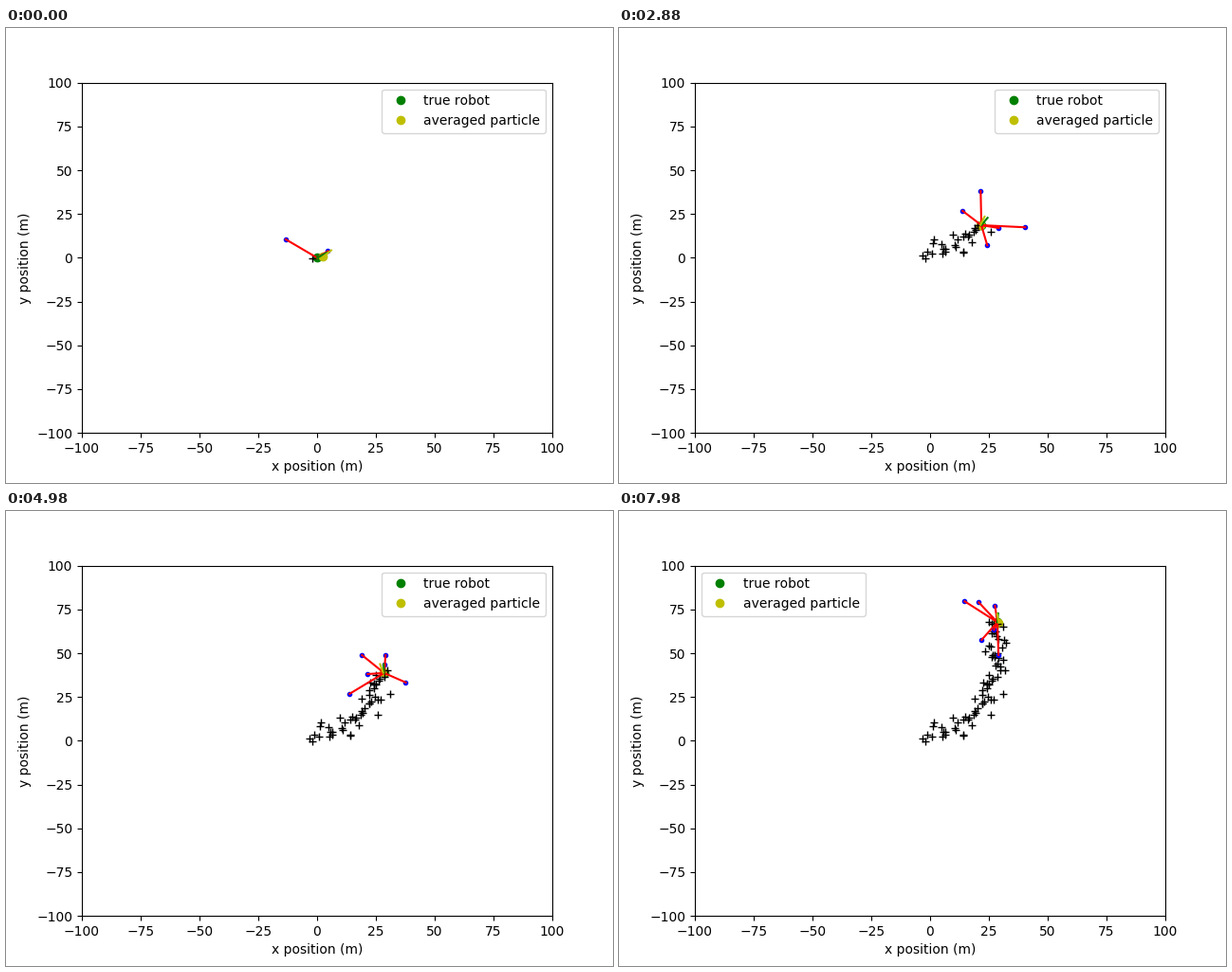
Recreate the animation shown at these times as a matplotlib script. Size 640 px wide and 480 px high, loop 8000 ms.

```python
import numpy as np
import matplotlib.pyplot as plt
from matplotlib.animation import FuncAnimation

STEPS, LOOP = 134, 8000
SPEED, RANGE, NOSE = 0.6, 20.0, 5.0
READINGS, NOISE = 74, 2.8
LEGEND_MOVE = 130

# step, x, y and heading in degrees along the drive
WAYPOINTS = np.array([
    (0, 0, 0, 35), (15, 7, 5.6, 40), (48, 21.8, 18.6, 58),
    (67, 26.1, 29.4, 76), (83, 28.5, 38.7, 93), (103, 26.7, 50.4, 107),
    (133, 28.6, 67.7, 86)])

LANDMARKS = np.array([
    (-13.3, 10.5), (4.6, 3.8), (24.3, 7.1), (13.8, 26.8), (21.5, 38.1),
    (29.2, 17), (40.5, 17.4), (29.1, 48.9), (28.8, 43.3), (37.7, 33.3),
    (19.1, 48.9), (21.9, 57.6), (27.2, 63.4), (27.6, 77.1), (20.7, 79),
    (14.7, 79.6)])


def unit(deg):
    rad = np.radians(deg)
    return np.stack([np.cos(rad), np.sin(rad)], axis=-1)


def drive(steps):
    """Smooth curve through the waypoints, leaving each along its heading."""
    when, points = WAYPOINTS[:, 0], WAYPOINTS[:, 1:3]
    slopes = SPEED * unit(WAYPOINTS[:, 3])
    i = np.clip(np.searchsorted(when, steps, "right") - 1, 0, len(when) - 2)
    span = (when[i + 1] - when[i])[:, None]
    u = (steps - when[i])[:, None] / span
    return ((1 + 2 * u) * (1 - u) ** 2 * points[i]
            + u * (1 - u) ** 2 * span * slopes[i]
            + u * u * (3 - 2 * u) * points[i + 1]
            + u * u * (u - 1) * span * slopes[i + 1])


steps = np.arange(STEPS)
robot = drive(steps)
heading = np.interp(steps, WAYPOINTS[:, 0], WAYPOINTS[:, 3])

# the estimate closes in on the robot, then drifts slowly around it
settle = 2 * np.exp(-steps / 10)
drift = 0.6 * np.cos(2 * np.pi * steps / (STEPS - 1))
average = robot + np.outer(settle, (1, 0.45)) + np.outer(drift, (1, -0.5))
robot_nose = robot + NOSE * unit(heading)
average_nose = average + NOSE * unit(heading + 12)

rng = np.random.default_rng(4)
arrivals = np.linspace(0, STEPS - 1, READINGS).astype(int)
readings = robot[arrivals] + rng.normal(0, NOISE, (READINGS, 2))

plt.rcParams["text.kerning_factor"] = 6
fig, ax = plt.subplots(figsize=(6.4, 4.8), dpi=100)
ax.set(xlim=(-100, 100), ylim=(-100, 100),
       xlabel="x position (m)", ylabel="y position (m)")

robot_dot, = ax.plot([], [], "go", label="true robot")
average_dot, = ax.plot([], [], "yo", label="averaged particle")
crosses, = ax.plot([], [], "k+")
seen_dots, = ax.plot([], [], "b.")
beams, = ax.plot([], [], "r-")
robot_line, = ax.plot([], [], "g-")
average_line, = ax.plot([], [], "y-")
legend = ax.legend(loc="upper right")


def place(artist, points):
    points = np.asarray(points).reshape(-1, 2)
    artist.set_data(points[:, 0], points[:, 1])


def draw(n):
    here = robot[n]
    seen = LANDMARKS[np.hypot(*(LANDMARKS - here).T) < RANGE]
    place(seen_dots, seen)
    place(beams, [p for mark in seen for p in (here, mark, (np.nan, np.nan))])
    place(robot_dot, here)
    place(average_dot, average[n])
    place(robot_line, [here, robot_nose[n]])
    place(average_line, [average[n], average_nose[n]])
    place(crosses, readings[arrivals <= n])
    legend.set_loc("upper right" if n < LEGEND_MOVE else "upper left")


anim = FuncAnimation(fig, draw, frames=STEPS, init_func=lambda: draw(0),
                     interval=LOOP / STEPS, repeat=True, repeat_delay=0)
plt.show()
```
